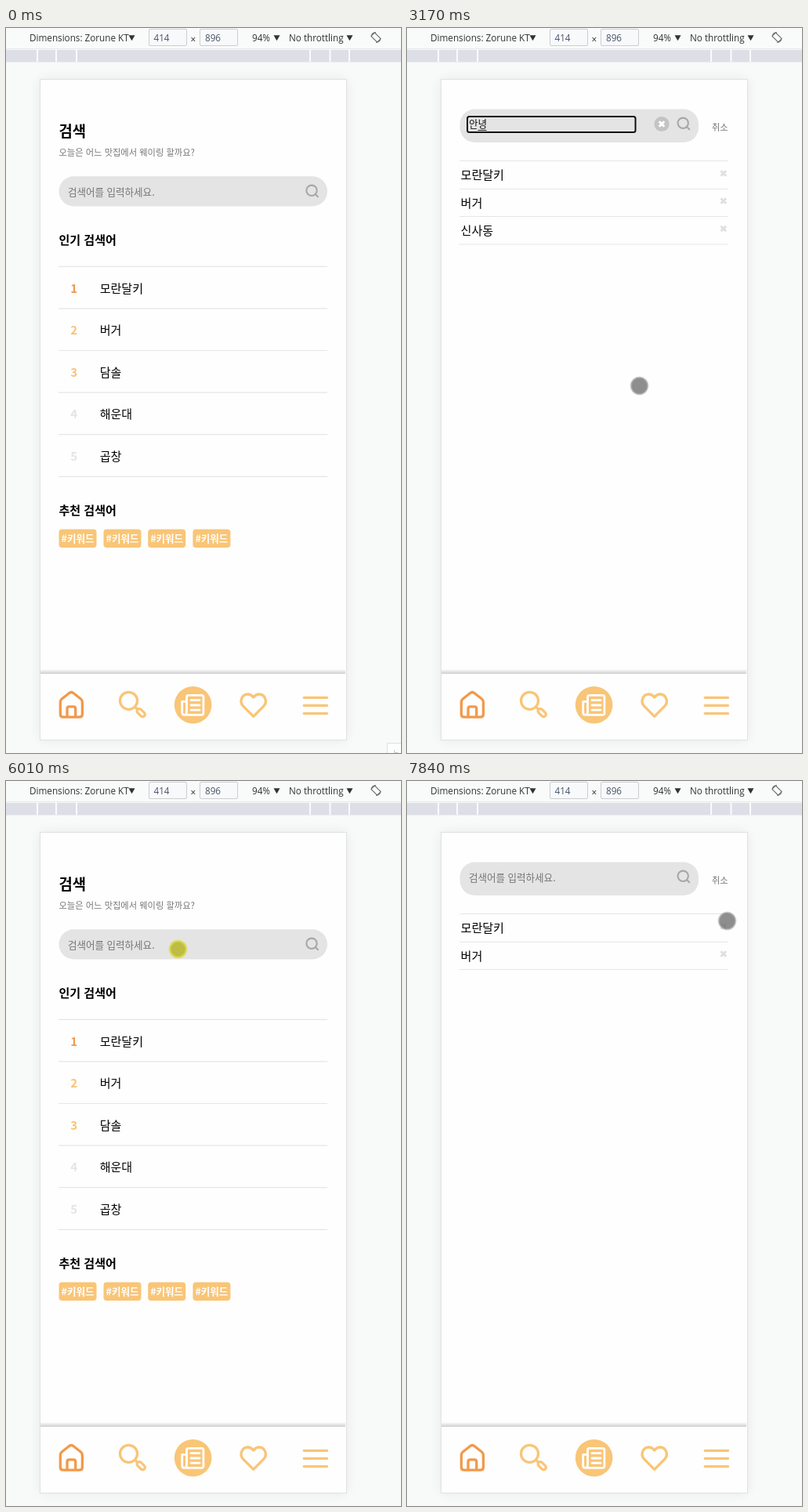
An HTML page for the animation above (8 s loop, 504 px wide and 925 px high).

```html
<!DOCTYPE html>
<html lang="ko">
<head>
<meta charset="utf-8">
<title>Search screen</title>
<style>
html, body { margin: 0; width: 100%; height: 100%; overflow: hidden; background: #f8faf9; }
svg { display: block; }
text, .typed { font: 15.04px "Noto Sans CJK KR", "Noto Sans CJK", sans-serif; fill: #000; }
.bar text { font: 11.7px "Open Sans", sans-serif; fill: #333; }
.bar .field { fill: #47536b; }
.title { font-size: 18.8px; font-weight: 700; }
.bold { font-weight: 700; }
.small { font-size: 11.28px; fill: #777; }
.hint { font-size: 12.53px; fill: #757575; }
.tag { font-size: 12.53px; font-weight: 700; fill: #fff; }
.rule { stroke: #e6e6e6; stroke-width: 1.2; fill: none; }
.pale { fill: #e4e4e4; }
.line { fill: none; stroke-linecap: round; stroke-linejoin: round; stroke-width: 3.3; }
.sand { stroke: #f9c577; }
.typed { font-size: 12.53px; line-height: 20px; color: #111; white-space: nowrap; }

/* Hard switches share one 8 s clock; 1% is 80 ms. */
.step, .typed::before { animation: 8s step-end infinite; }
.home { animation-name: home; }
.find { animation-name: find; }
.focus { animation-name: focus; }
.empty { animation-name: empty; }
.filled { animation-name: filled; }
.typed::before { content: ""; animation-name: type; }
.compose { animation-name: compose; }
.caret { animation-name: caret; }
.last { animation-name: last; }
.corner { animation-name: corner; }
.seen { animation-name: seen; }
.dot { fill: rgba(98, 98, 98, .72); stroke: rgba(150, 150, 150, .66); stroke-width: 2.2; animation-name: press; }
.move { animation: move 8s linear infinite; }

@keyframes home { 0%, 62.875% { opacity: 1 } 11%, 75.875% { opacity: 0 } }
@keyframes find { 0%, 62.875% { opacity: 0 } 11%, 75.875% { opacity: 1 } }
@keyframes focus { 0% { opacity: 1 } 84% { opacity: 0 } }
@keyframes empty { 0%, 62.875% { opacity: 1 } 26.375% { opacity: 0 } }
@keyframes filled { 0%, 62.875% { opacity: 0 } 26.375% { opacity: 1 } }
@keyframes type {
  0%, 62.875% { content: "" }
  26.375% { content: "ㅇ" }
  27.125% { content: "아" }
  28% { content: "안" }
  28.75% { content: "안ㄴ" }
  30% { content: "안녀" }
  32.875% { content: "안녕" }
}
@keyframes compose {
  0% { transform: none }
  28.75% { transform: translateX(11.5px) }
}
@keyframes caret {
  0% { opacity: 1; transform: none }
  14.875% { opacity: 0; transform: none }
  21.125% { opacity: 1; transform: none }
  26.375% { opacity: 1; transform: translateX(12px) }
  28.75% { opacity: 1; transform: translateX(23.5px) }
  39.625% { opacity: 0; transform: translateX(23.5px) }
  50.125% { opacity: 1; transform: translateX(23.5px) }
  62.875% { opacity: 1; transform: none }
  82.125% { opacity: 0; transform: none }
}
@keyframes last { 0% { opacity: 1 } 92.5% { opacity: 0 } }
@keyframes corner { 0% { opacity: 1 } 1.125% { opacity: 0 } }
@keyframes seen { 0%, 61.875% { opacity: 0 } 1.5%, 70.125% { opacity: 1 } }
@keyframes press {
  0%, 11%, 75.875%, 84.5%, 92.5% { fill: rgba(98, 98, 98, .72); stroke: rgba(150, 150, 150, .66) }
  9.875%, 74.875%, 83%, 91% { fill: #bebc42; stroke: #d9d94c }
}
@keyframes move {
  0%, 1.5% { transform: translate(486px, 905px) }
  3% { transform: translate(430px, 640px) }
  4.5% { transform: translate(330px, 320px) }
  5.6% { transform: translate(262px, 170px) }
  7%, 14.625% { transform: translate(235.5px, 210.5px) }
  18% { transform: translate(272px, 400px) }
  20% { transform: translate(296px, 467px) }
  21.25%, 52.625% { transform: translate(296.5px, 456.5px) }
  55% { transform: translate(300px, 380px) }
  57% { transform: translate(330px, 190px) }
  59.125%, 60% { transform: translate(340.5px, 103.5px) }
  61% { transform: translate(170px, 190px) }
  61.85% { transform: translate(27px, 240px) }
  70.125% { transform: translate(90px, 150px) }
  72% { transform: translate(180px, 205px) }
  73.5%, 80% { transform: translate(219.5px, 214.5px) }
  82.5%, 84.5% { transform: translate(245px, 296px) }
  85.5% { transform: translate(272px, 319px) }
  86.375% { transform: translate(309.5px, 287.5px) }
  88% { transform: translate(380px, 263px) }
  89% { transform: translate(416px, 258px) }
  89.75%, 93% { transform: translate(404px, 256px) }
  96% { transform: translate(414px, 205px) }
  98%, 100% { transform: translate(408.5px, 178.5px) }
}
</style>
</head>
<body>
<svg width="504" height="925" viewBox="0 0 504 925">
  <defs>
    <filter id="blur" x="-20%" y="-20%" width="140%" height="140%"><feGaussianBlur stdDeviation="8"/></filter>
    <linearGradient id="shade" x2="0" y2="1">
      <stop offset="0" stop-color="#000" stop-opacity="0"/>
      <stop offset="1" stop-color="#000" stop-opacity=".19"/>
    </linearGradient>
    <path id="down" d="M-4-3.5H4L0 3.5Z" fill="#333"/>
    <g id="lens" fill="none" stroke="#aaa6a6" stroke-width="2.1" stroke-linecap="round">
      <circle r="6.7"/><path d="M5 5L8 8"/>
    </g>
    <path id="cross" d="M-3.3-3.3L3.3 3.3M3.3-3.3L-3.3 3.3" fill="none" stroke-width="3"/>
    <rect id="chip" y="639.5" width="48" height="23.5" rx="4" fill="#f9c577"/>
  </defs>

  <rect width="504" height="925" fill="#f8faf9"/>

  <g class="bar">
    <rect width="504" height="26" fill="#f9fafa"/>
    <path d="M0 26.5H504" stroke="#e6e8ea"/>
    <rect y="28" width="504" height="15.5" fill="#dcdfe6"/>
    <path d="M40 28V43M64 28V43M90 28V43M388 28V43M413.5 28V43M438 28V43" stroke="#fafbfb" stroke-width="2"/>
    <text x="30" y="17">Dimensions: Zorune KT</text>
    <use href="#down" x="160.5" y="12.7"/>
    <g fill="#f8f9fa" stroke="#cbcdd0">
      <rect x="182.5" y="1.5" width="48" height="21" rx="1.5"/>
      <rect x="247.5" y="1.5" width="48" height="21" rx="1.5"/>
    </g>
    <text class="field" x="188.5" y="17">414</text>
    <text x="235.5" y="18.5">×</text>
    <text class="field" x="254" y="17">896</text>
    <text x="314" y="17">94%</text>
    <use href="#down" x="345.5" y="12.7"/>
    <text x="361" y="17">No throttling</text>
    <use href="#down" x="438.5" y="12.7"/>
    <g fill="none" stroke="#6e6e6e" stroke-width="1.2">
      <rect x="-3.2" y="-5.5" width="6.4" height="11" rx="1" transform="translate(472 12) rotate(-45)"/>
      <path d="M466 11A6.3 6.3 0 0 1 472 5.6M478 13A6.3 6.3 0 0 1 472 18.4"/>
    </g>
  </g>

  <rect x="44" y="66" width="390" height="842" fill="#000" opacity=".08" filter="url(#blur)"/>
  <rect x="43.5" y="65.5" width="391" height="843" fill="#fefefe" stroke="#dfe1e0"/>

  <g class="step home">
    <text class="title" x="67.5" y="138.7">검색</text>
    <text class="small" x="67.5" y="162.7">오늘은 어느 맛집에서 웨이링 할까요?</text>
    <rect class="pale" x="67.5" y="189.3" width="342.5" height="38.2" rx="19"/>
    <text class="hint" x="79" y="213.7">검색어를 입력하세요.</text>
    <use href="#lens" x="390" y="207.3"/>
    <text class="bold" x="67.5" y="276">인기 검색어</text>
    <path class="rule" d="M67 304.3H410M67 357.9H410M67 411.5H410M67 465.1H410M67 518.7H410M67 572.3H410"/>
    <g class="bold">
      <text class="bold" x="82.3" y="337.6" style="fill:#f0994c">1</text>
      <text class="bold" x="82.3" y="391.2" style="fill:#f9c373">2</text>
      <text class="bold" x="82.3" y="444.8" style="fill:#f9c373">3</text>
      <text class="bold" x="82.3" y="498.4" style="fill:#e4e4e4">4</text>
      <text class="bold" x="82.3" y="552" style="fill:#e4e4e4">5</text>
    </g>
    <text x="119.7" y="337.6">모란달키</text>
    <text x="119.7" y="391.2">버거</text>
    <text x="119.7" y="444.8">담솔</text>
    <text x="119.7" y="498.4">해운대</text>
    <text x="119.7" y="552">곱창</text>
    <text class="bold" x="67.5" y="620.7">추천 검색어</text>
    <use href="#chip" x="67.5"/><text class="tag" x="70.5" y="655.9">#키워드</text>
    <use href="#chip" x="124.5"/><text class="tag" x="127.5" y="655.9">#키워드</text>
    <use href="#chip" x="181.2"/><text class="tag" x="184.2" y="655.9">#키워드</text>
    <use href="#chip" x="238.4"/><text class="tag" x="241.4" y="655.9">#키워드</text>
  </g>

  <g class="step find">
    <rect class="pale" x="67.5" y="103.5" width="304.5" height="42.5" rx="19"/>
    <text class="hint step empty" x="79" y="127.7">검색어를 입력하세요.</text>
    <g class="step filled">
      <foreignObject x="79" y="112" width="80" height="20"><div class="typed"></div></foreignObject>
      <rect class="step compose" x="79" y="130" width="11" height="1" fill="#222"/>
      <circle cx="325" cy="122.5" r="9.6" fill="#c3c3c3"/>
      <use href="#cross" x="325" y="122.5" stroke="#fff"/>
    </g>
    <g class="step focus">
      <rect x="77" y="113" width="214.5" height="20" rx="2.5" fill="none" stroke="#101010" stroke-width="2"/>
      <rect class="step caret" x="78.3" y="114.5" width="1" height="17" fill="#111"/>
    </g>
    <use href="#lens" x="352.2" y="121.3"/>
    <text class="small" x="389" y="131">취소</text>
    <path class="rule" d="M67 169.5H410M67 205.5H410M67 240.5H410"/>
    <text x="68.6" y="193.4">모란달키</text>
    <text x="68.6" y="229.2">버거</text>
    <g stroke="#e0e0e0">
      <use href="#cross" x="403.8" y="185.5"/>
      <use href="#cross" x="403.8" y="220.6"/>
    </g>
    <g class="step last">
      <text x="68.6" y="263.8">신사동</text>
      <use href="#cross" x="403.8" y="256" stroke="#e0e0e0"/>
      <path class="rule" d="M67 276H410"/>
    </g>
  </g>

  <g>
    <rect x="44" y="818" width="389" height="6" fill="url(#shade)"/>
    <rect x="44" y="824" width="390" height="84" fill="#fefefe"/>
    <path class="line" stroke="#f2994a" d="M69.3 860Q69.3 857.5 71.2 856L81 848.3Q83.3 846.6 85.6 848.3L95.4 856Q97.4 857.5 97.4 860V875.5Q97.4 879.2 93.7 879.2H73Q69.3 879.2 69.3 875.5ZM78 879V868.5Q78 865.8 80.5 865.8H86.2Q88.7 865.8 88.7 868.5V879"/>
    <g class="line sand">
      <circle cx="156.5" cy="858.3" r="11"/>
      <path d="M164.5 866.3L167.5 869"/>
      <rect x="-6" y="-3" width="12" height="6" rx="3" transform="translate(172.2 873.7) rotate(45)"/>
      <path d="M315.7 878.3L302.8 865.4C296.8 859.2 301.5 850 308.5 850C312 850 314 851.8 315.7 854C317.4 851.8 319.4 850 322.9 850C329.9 850 334.6 859.2 328.6 865.4Z"/>
      <path d="M380.2 854.3H409.6M380.2 864.3H409.6M380.2 874.6H409.6"/>
    </g>
    <circle cx="238.6" cy="863.7" r="23.8" fill="#f9c577"/>
    <path class="line" stroke="#fff" style="stroke-width:2.8" d="M230.5 873V853.5Q230.5 851.3 232.7 851.3H249.7Q251.9 851.3 251.9 853.5V874Q251.9 876.3 249.6 876.3H227.5Q224.7 876.3 224.7 873.5V859.3H230.5V873Q230.5 876.3 227.5 876.3M236 857.7H247M236 864H247M236 870.2H247"/>
  </g>

  <g class="step corner">
    <rect x="486.5" y="912.5" width="30" height="30" fill="#fcfdfd" stroke="#dfe0e0"/>
    <path d="M495.5 921V924.5H500" fill="none" stroke="#c9c9c9"/>
  </g>

  <g class="step seen"><g class="move"><circle class="step dot" r="10.4"/></g></g>
</svg>
</body>
</html>
```
